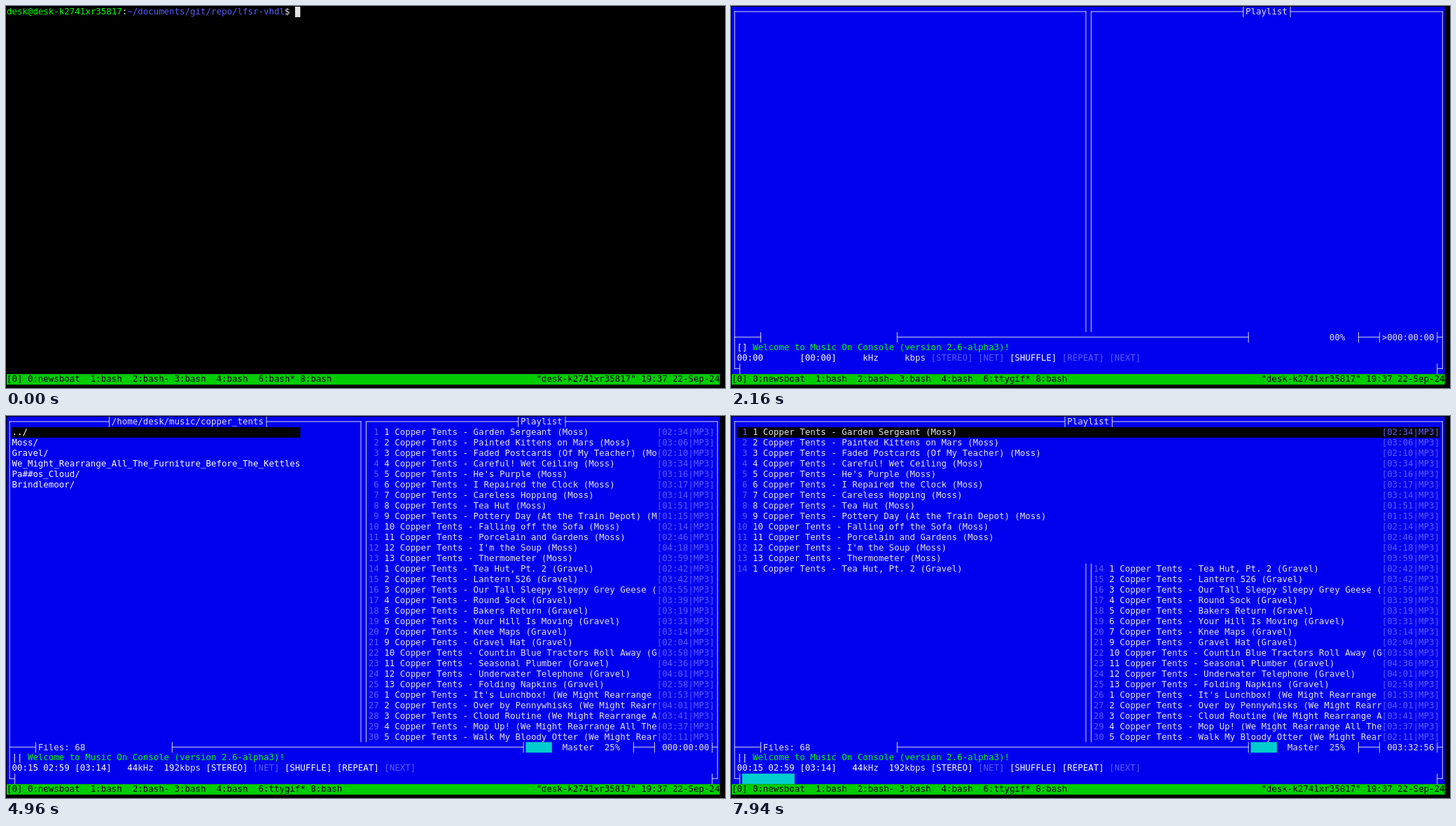
These frames come from a looping animation (1027 px wide and 545 px high, 8000 ms). An HTML page with a canvas:

```html
<!DOCTYPE html>
<html lang="en">
<head>
<meta charset="utf-8">
<title>Music player in a terminal</title>
<style>
html, body { margin: 0; width: 100%; height: 100%; overflow: hidden; background: #000; }
canvas { display: block; }
</style>
</head>
<body>
<canvas id="term" width="1027" height="545"></canvas>
<script>
const ctx = document.getElementById('term').getContext('2d');
// The screen is a grid of 8 by 16 dots with a margin of one dot, scaled down
const DOT = 1027 / 1097, LOOP = 8000;
const BLACK = '#000', BLUE = '#0000ee', DIM = '#5c5cff', GREY = '#e5e5e5', WHITE = '#fff';
const LIME = '#00ff00', GREEN = '#00cd00', CYAN = '#00cdcd';

const USER = 'desk', HOST = 'desk-k2741xr35817';
const BAND = 'Copper Tents';
const PATH = `/home/${USER}/music/copper_tents`;
const LONG = 'We_Might_Rearrange_All_The_Furniture_Before_The_Kettles';
const DIRS = ['../', 'Moss/', 'Gravel/', LONG, 'Pa##os_Cloud/', 'Brindlemoor/'];

// Each track: number, title, length
const ALBUMS = {
  'Moss': `1|Garden Sergeant|02:34
2|Painted Kittens on Mars|03:06
3|Faded Postcards (Of My Teacher)|02:10
4|Careful! Wet Ceiling|03:34
5|He's Purple|03:16
6|I Repaired the Clock|03:17
7|Careless Hopping|03:14
8|Tea Hut|01:51
9|Pottery Day (At the Train Depot)|01:15
10|Falling off the Sofa|02:14
11|Porcelain and Gardens|02:46
12|I'm the Soup|04:18
13|Thermometer|03:59`,
  'Gravel': `1|Tea Hut, Pt. 2|02:42
2|Lantern 526|03:42
3|Our Tall Sleepy Sleepy Grey Geese|03:55
4|Round Sock|03:39
5|Bakers Return|03:19
6|Your Hill Is Moving|03:31
7|Knee Maps|03:14
9|Gravel Hat|02:04
10|Countin Blue Tractors Roll Away|03:58
11|Seasonal Plumber|04:36
12|Underwater Telephone|04:01
13|Folding Napkins|02:58`,
  [LONG.replaceAll('_', ' ')]: `1|It's Lunchbox!|01:53
2|Over by Pennywhisks|04:01
3|Cloud Routine|03:41
4|Mop Up!|03:37
5|Walk My Bloody Otter|02:11`
};
const TRACKS = Object.entries(ALBUMS).flatMap(([album, list]) =>
  list.split('\n').map(line => {
    const [no, title, time] = line.split('|');
    return { text: `${no} ${BAND} - ${title} (${album})`, time: `[${time}|MP3]` };
  }));

// Moments at which the screen is repainted
const STEPS = [0, 860, 940, 1100, 1350, 1710];
for (let t = 1760; t <= 4960; t += 100) STEPS.push(t);
STEPS.push(5830, 7540, 7640, 7740, 7840, 7940);

const X = col => DOT * (1 + col * 8);
const Y = row => DOT * (1 + row * 16);
const lineX = col => X(col) + 4 * DOT;
const lineY = row => Y(row) + 7 * DOT;

// Edges stay fractional, so that they are smoothed like a scaled screen
function rect(x0, y0, x1, y1, color) {
  ctx.fillStyle = color;
  ctx.fillRect(x0, y0, x1 - x0, y1 - y0);
}
function cells(col, row, w, h, color) {
  rect(X(col), Y(row), X(col + w), Y(row + h), color);
}
function put(col, row, text, color) {
  const base = Math.round(Y(row) + 12 * DOT);
  ctx.fillStyle = color;
  for (let i = 0; i < text.length; i++) {
    if (text[i] !== ' ') ctx.fillText(text[i], X(col + i), base);
  }
}
function hline(row, c0, c1) {
  rect(lineX(c0), lineY(row), lineX(c1) + DOT, lineY(row) + DOT, GREY);
}
function vline(col, y0, y1) {
  rect(lineX(col), y0, lineX(col) + DOT, y1, GREY);
}
function tee(col, row) { vline(col, Y(row), Y(row + 1)); }

function title(left, width, text) {
  const c = left + Math.round((width - text.length) / 2), end = c + text.length;
  rect(lineX(c - 1) + DOT, Y(0), lineX(end), Y(1), BLUE);
  tee(c - 1, 0);
  tee(end, 0);
  put(c, 0, text, GREY);
}

function shell(t) {
  const cwd = '~/documents/git/repo/lfsr-vhdl', id = `${USER}@${HOST}`;
  const typed = [860, 940, 1100, 1350].filter(s => t >= s).length;
  const start = id.length + cwd.length + 3;
  put(0, 0, id, LIME);
  put(id.length, 0, ':', GREY);
  put(id.length + 1, 0, cwd, DIM);
  put(start - 2, 0, '$ ' + 'mocp'.slice(0, typed), GREY);
  if (t < 1710) cells(start + typed, 0, 1, 1, GREY);
  else cells(0, 1, 1, 1, GREY);
}

function statusBar(t) {
  cells(0, 35, 136, 1, GREEN);
  const job = t < 940 ? 'bash' : 'ttygif';
  put(0, 35, `[0] 0:newsboat  1:bash  2:bash- 3:bash  4:bash  6:${job}* 8:bash`, BLACK);
  const right = `"${HOST}" 19:37 22-Sep-24`;
  put(136 - right.length, 35, right, BLACK);
}

function panels(t, rows, wide) {
  cells(0, 0, 136, rows, BLUE);
  const bottom = Y(Math.min(rows, 31)), full = t >= 7540;
  vline(0, lineY(0), bottom);
  vline(135, lineY(0), bottom);
  const inner = full ? Y(wide + 1) : lineY(0);
  vline(67, inner, bottom);
  vline(68, inner, bottom);
  if (full) {
    hline(0, 0, 135);
    title(0, 136, 'Playlist');
  } else {
    hline(0, 0, 67);
    hline(0, 68, 135);
    if (t >= 2560) title(0, 68, PATH);
  }
  if (t < 7640) title(68, 68, 'Playlist');
}

function track(i, col) {
  const { text, time } = TRACKS[i];
  put(col, i + 1, String(i + 1).padStart(2), DIM);
  put(col + 3, i + 1, text.slice(0, 121 - col), GREY);
  put(124, i + 1, time, DIM);
}

function lists(t, count, wide) {
  const partial = t > 7540 ? wide + 1 : 0;
  if (t >= 2560 && t < 5830) cells(1, 1, LONG.length, 1, BLACK);
  if (t >= 5830) {
    const c = wide > 0 ? 1 : 69;
    cells(c, 1, 135 - c, 1, BLACK);
  }
  if (t >= 2560) {
    DIRS.forEach((dir, i) => { if (i + 1 > partial) put(1, i + 1, dir, WHITE); });
  }
  for (let i = 0; i < Math.min(count, 30); i++) track(i, i < wide ? 1 : 69);
  if (partial) {
    put(1, partial, String(partial).padStart(2), DIM);
    put(4, partial, TRACKS[partial - 1].text.slice(0, 63), GREY);
  }
}

function info(t, count) {
  const flag = (col, text, on) => put(col, 33, text, on ? WHITE : DIM);
  for (const c of [0, 135]) vline(c, Y(31), lineY(34) + DOT);
  for (const c of [5, 31, 98, 119, 123, 134]) tee(c, 31);
  for (const [a, b] of [[0, 5], [31, 98], [119, 123], [134, 135]]) hline(31, a, b);
  for (const c of [1, 134]) tee(c, 34);
  hline(34, 0, 1);
  hline(34, 134, 135);

  if (t >= 3060) put(6, 31, 'Files: ' + count, GREY);
  if (t >= 2260) {
    cells(99, 31, 5, 1, CYAN);
    put(106, 31, 'Master  25%', GREY);
  } else {
    put(114, 31, '00%', GREY);
  }
  if (t < 2560) put(124, 31, '>', GREY);
  put(125, 31, t >= 7540 ? '003:32:56' : '000:00:00', GREY);

  put(1, 32, t >= 2660 ? '||' : '[]', WHITE);
  put(4, 32, 'Welcome to Music On Console (version 2.6-alpha3)!', LIME);

  const loaded = t >= 4960, playing = t >= 2860;
  put(1, 33, t >= 2760 ? '00:15' : '00:00', WHITE);
  if (loaded) put(7, 33, '02:59', WHITE);
  put(13, 33, loaded ? '[03:14]' : '[00:00]', WHITE);
  if (playing) {
    put(23, 33, '44', WHITE);
    put(30, 33, '192', WHITE);
  }
  put(25, 33, 'kHz', GREY);
  put(33, 33, 'kbps', GREY);
  flag(38, '[STEREO]', playing);
  flag(47, '[NET]', false);
  flag(53, '[SHUFFLE]', true);
  flag(63, '[REPEAT]', t >= 2960);
  flag(72, '[NEXT]', false);
  if (t >= 5830) cells(2, 34, 10, 1, CYAN);
}

function player(t) {
  const rows = t >= 2160 ? 35 : Math.round((t - 1860) * 0.13);
  if (rows <= 0) return;
  const wide = t > 7540 ? Math.floor((t - 7540) * 0.034) : 0;
  const count = t < 3060 ? 0 : Math.min(68, Math.floor(22 + (t - 3660) * 46 / 1300));
  panels(t, rows, wide);
  if (rows < 35) return;
  lists(t, count, wide);
  info(t, count);
}

function paint(t) {
  ctx.fillStyle = BLACK;
  ctx.fillRect(0, 0, 1027, 545);
  ctx.font = '12.44px "DejaVu Sans Mono", monospace';
  ctx.textBaseline = 'alphabetic';
  if (t < 1860) shell(t);
  else player(t);
  statusBar(t);
}

let shown = -1;
const begin = performance.now();
function tick() {
  const t = (performance.now() - begin) % LOOP;
  const step = STEPS.findLast(s => s <= t);
  if (step !== shown) paint(shown = step);
  requestAnimationFrame(tick);
}
tick();
</script>
</body>
</html>
```
